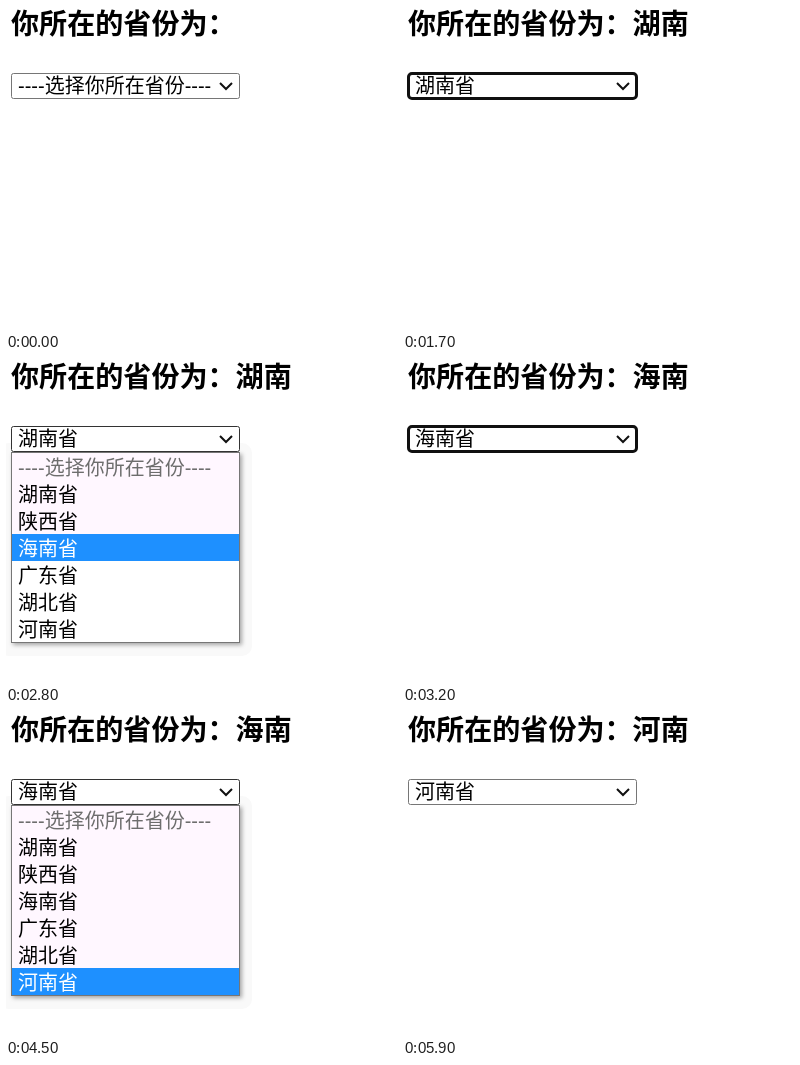
These frames come from a looping animation (391 by 325 pixels, 6.1 s). An HTML page:

```html
<!DOCTYPE html>
<html lang="zh-CN">
<head>
<meta charset="utf-8">
<style>
html, body { margin: 0; width: 100%; height: 100%; overflow: hidden; background: #fff }
svg { display: block }
text { font: 20px "Liberation Sans", "Noto Sans CJK SC", "Noto Sans CJK", sans-serif; white-space: pre }
#title { font: bold 28.08px "Noto Sans CJK SC", "Noto Sans CJK", sans-serif }
#panel { filter: drop-shadow(2px 2px 2px #0005) }
</style>
</head>
<body>
<svg width="391" height="325" viewBox="0 0 391 325">
  <text id="title" x="5" y="27.7"></text>
  <g id="popup">
    <rect x="-7" y="84" width="253" height="213" rx="10" fill="#f9f9f9"/>
    <rect id="panel" x="5.5" y="93.5" width="228" height="190" fill="#fff" stroke="#767676"/>
    <g id="rows"></g>
  </g>
  <rect id="box" x="5.5" y="67.5" width="228" height="25" fill="#fff"/>
  <text id="value" x="12" y="87.3"></text>
  <path d="M214 77l6 6 6-6" fill="none" stroke="#111" stroke-width="2"/>
</svg>
<script>
const $ = id => document.getElementById(id);
const options = ['----选择你所在省份----', '湖南省', '陕西省', '海南省', '广东省', '湖北省', '河南省'];
const GREY = '#767676', HOVER = '#505050', DARK = '#333', RING = '#101010';
const LOOP = 6100, CLOSED = -1;

// start time, chosen option, border colour, highlighted row
const steps = [
  [0, 0, GREY, CLOSED],
  [400, 0, HOVER, CLOSED],
  [600, 0, HOVER, 0],
  [800, 0, DARK, 0],
  [1200, 0, DARK, 1],
  [1700, 1, RING, CLOSED],
  [2400, 1, HOVER, 1],
  [2500, 1, DARK, 1],
  [2700, 1, DARK, 2],
  [2800, 1, DARK, 3],
  [3200, 3, RING, CLOSED],
  [3900, 3, DARK, 3],
  [4200, 3, DARK, 4],
  [4300, 3, DARK, 5],
  [4500, 3, DARK, 6],
  [5000, 6, RING, CLOSED],
  [5900, 6, GREY, CLOSED]
];

$('rows').innerHTML = options.map((name, i) =>
  `<rect x="6" y="${94 + 27 * i}" width="227" height="27"/><text x="12" y="${115.6 + 27 * i}">${name}</text>`).join('');
const bars = $('rows').querySelectorAll('rect');
const labels = $('rows').querySelectorAll('text');

function setAttrs(el, attrs) {
  for (const key in attrs) el.setAttribute(key, attrs[key]);
}

function show([, chosen, border, hot]) {
  const focused = border === RING;
  $('title').textContent = '你所在的省份为：' + (chosen ? options[chosen].slice(0, 2) : '');
  $('value').textContent = options[chosen];
  setAttrs($('box'), { stroke: border, 'stroke-width': focused ? 3 : 1, rx: focused ? 3.5 : 2 });
  $('popup').style.display = hot === CLOSED ? 'none' : '';
  options.forEach((_, i) => {
    const on = i === hot;
    // rows above the highlight are tinted
    const paper = i < hot ? '#fff7ff' : '#fff';
    setAttrs(bars[i], { fill: on ? (i ? '#1e90ff' : '#c8c8c8') : paper });
    setAttrs(labels[i], { fill: on ? '#fff' : i ? '#000' : '#6d6d6d' });
  });
}

let current;
function tick() {
  const t = performance.now() % LOOP;
  const step = steps.findLast(s => s[0] <= t);
  if (step !== current) show(current = step);
  requestAnimationFrame(tick);
}
tick();
</script>
</body>
</html>
```
